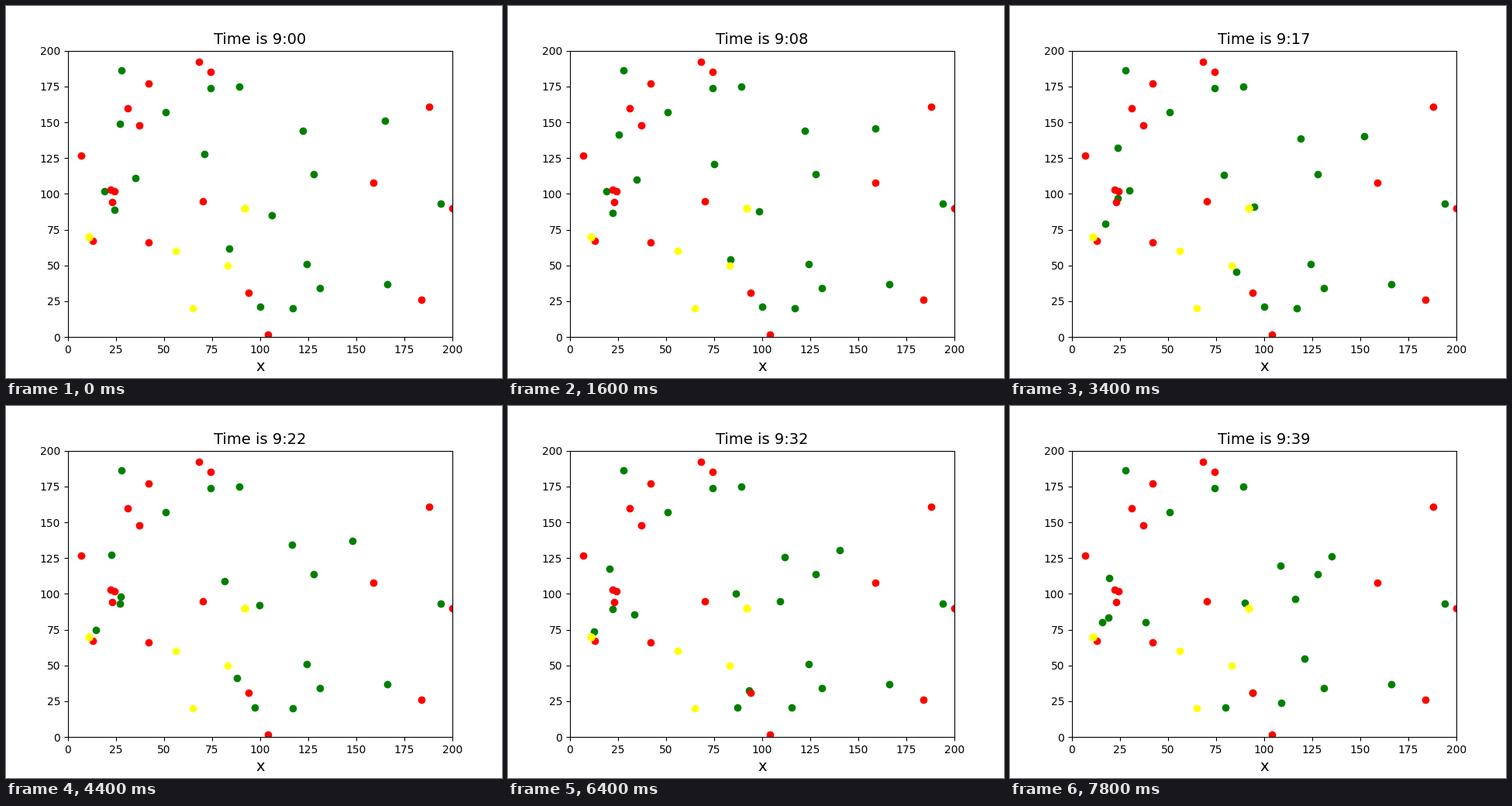
A matplotlib script for the animation above (8 s loop, 640 by 480 pixels).

```python
import math

import matplotlib.pyplot as plt
from matplotlib.animation import FuncAnimation

FRAMES, INTERVAL = 40, 200

PARK, HALL, CAFE, SHOP, GYM = (11, 70), (92, 90), (56, 60), (83, 50), (65, 20)
# Repeated stops sit on top of each other, which firms up their rims
STOPS = [PARK] * 6 + [HALL] * 6 + [CAFE, SHOP, GYM]

OFFICES = [
    (7, 127), (31, 160), (42, 177), (37, 148), (68, 192), (74, 185),
    (22, 103), (24, 102), (23, 94), (13, 67), (42, 66), (70, 95),
    (94, 31), (104, 2), (159, 108), (188, 161), (200, 90), (184, 26),
]

# Walkers that stay at home for the whole loop
RESTING = [(28, 186), (74, 174), (89, 175), (51, 157),
           (128, 114), (194, 93), (166, 37), (131, 34)]

# (minute of departure, route)
WALKERS = [
    (0, [(165, 151), HALL]),
    (0, [(27, 149), PARK]),
    (0, [(71, 128), HALL]),
    (7, [(35, 111), PARK]),
    (5, [(24, 89), PARK, (68, 192)]),
    (10, [(19, 102), CAFE]),
    (0, [(84, 62), SHOP, (94, 31)]),
    (0, [(106, 85), HALL, (159, 108)]),
    (11, [(122, 144), HALL]),
    (19, [(100, 21), GYM]),
    (34, [(124, 51), HALL]),
    (30, [(117, 20), PARK]),
]


def position(start, route, minute):
    """Walk one unit per minute along the route, in whole steps per leg."""
    steps = max(0, minute - start)
    for (x0, y0), (x1, y1) in zip(route, route[1:]):
        dist = math.hypot(x1 - x0, y1 - y0)
        if steps < int(dist):
            k = steps / dist
            return x0 + k * (x1 - x0), y0 + k * (y1 - y0)
        steps -= int(dist)
    return route[-1]


fig, ax = plt.subplots(figsize=(6.4, 4.8), dpi=100)
ax.set_xlim(0, 200)
ax.set_ylim(0, 200)
ax.set_xlabel("x", fontsize=14)
title = ax.set_title("Time is 9:00", fontsize=14)


def dots(points, color):
    return ax.plot(*zip(*points), "o", color=color, markersize=6)[0]


people = dots(RESTING, "green")
dots(OFFICES, "red")
dots(STOPS, "yellow")


def update(minute):
    points = RESTING + [position(s, route, minute) for s, route in WALKERS]
    people.set_data(*zip(*points))
    title.set_text(f"Time is 9:{minute:02d}")
    return people, title


anim = FuncAnimation(fig, update, frames=FRAMES, interval=INTERVAL,
                     repeat=True, repeat_delay=0, blit=False)
plt.show()
```
